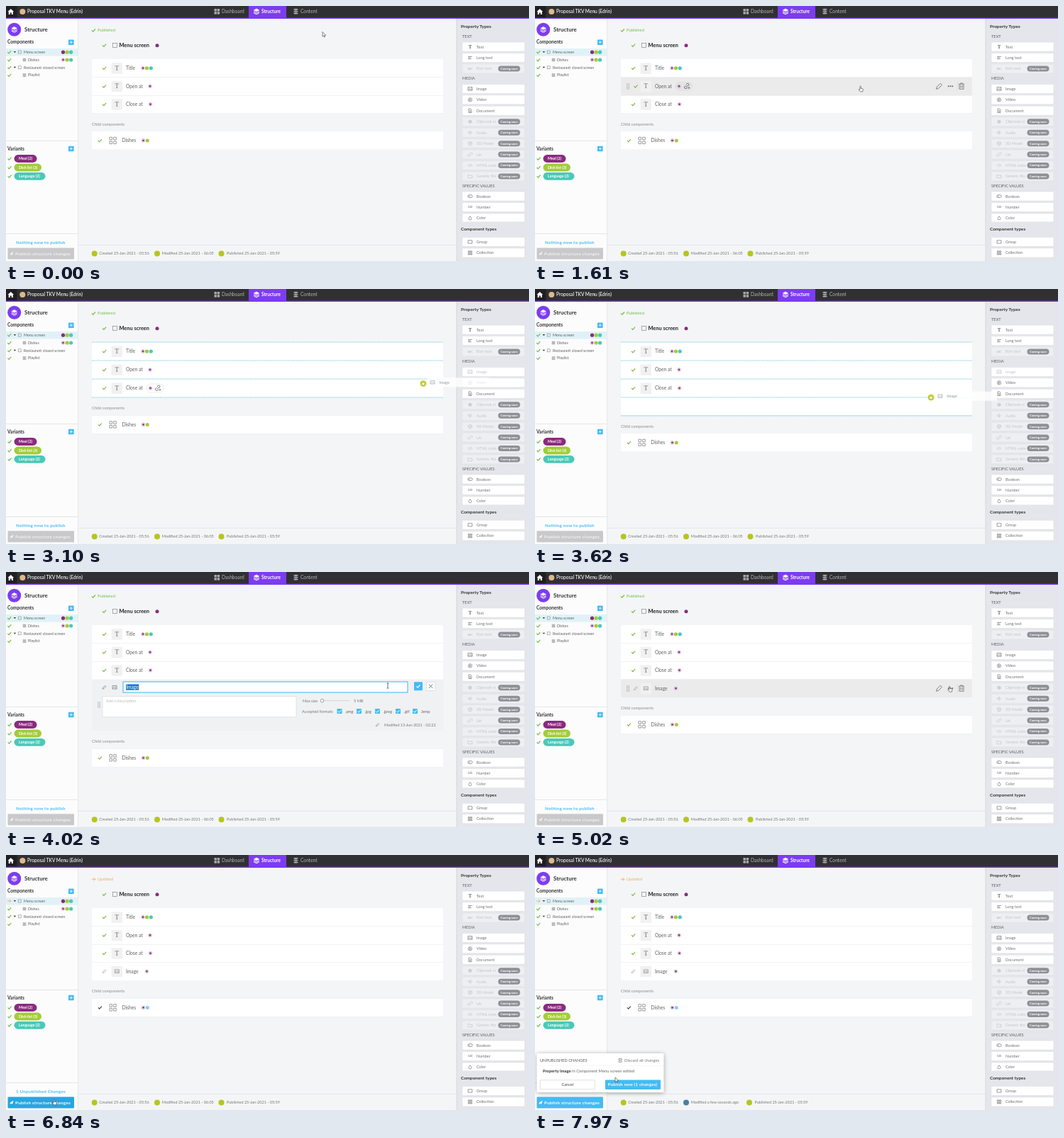
An HTML page for the animation above (8 s loop, 737x360 px).

```html
<!DOCTYPE html>
<html lang="en">
<head>
<meta charset="utf-8">
<title>Structure editor</title>
<style>
html, body { margin: 0; width: 100%; height: 100%; overflow: hidden; background: #f4f5f7; }
svg { display: block; width: 737px; height: 360px; font-family: Lato, "Open Sans", sans-serif; }
.card { filter: drop-shadow(0 .5px .7px #0002); }
.pop { filter: drop-shadow(0 1px 3px #0005); }
.serif { font-family: "Noto Serif", serif; }
</style>
</head>
<body>
<svg id="stage" viewBox="0 0 737 360"></svg>
<script>
const BLUE = '#45bbf2', PURPLE = '#8c2a80', LIME = '#a4cc39', TEAL = '#4ac9b8',
      GREEN = '#72bf44', GREY = '#8d8d8d', INK = '#606060', VIOLET = '#7d3cf0', ORANGE = '#eeb054';

// Drawing helpers; text is placed by its vertical centre
const text = (x, y, size, str, fill = INK, weight = 400, more = '') =>
  `<text x="${x}" y="${y + size * .35}" font-size="${size}" fill="${fill}" font-weight="${weight}" ${more}>${str}</text>`;
const rect = (x, y, w, h, fill, more = '') =>
  `<rect x="${x}" y="${y}" width="${w}" height="${h}" fill="${fill}" ${more}/>`;
const dot = (x, y, r, fill, more = '') => `<circle cx="${x}" cy="${y}" r="${r}" fill="${fill}" ${more}/>`;
const line = (d, color, w = .7, fill = 'none', more = '') =>
  `<path d="${d}" stroke="${color}" stroke-width="${w}" fill="${fill}" ${more}/>`;
const at = (x, y, body, scale = 1) => `<g transform="translate(${x} ${y}) scale(${scale})">${body}</g>`;
const card = (y, h) => rect(121, y, 495, h, '#fff', 'rx="1" class="card"');
const spaced = 'letter-spacing=".25"', centered = 'text-anchor="middle"';

// Icons
const check = (x, y, c = GREEN, w = 1.2) => line(`M${x - 2.4} ${y}l1.8 1.8 3.2-3.6`, c, w);
const arrowRight = (x, y) => line(`M${x - 2.6} ${y}h5m-2.2-2.2l2.2 2.2-2.2 2.2`, ORANGE, .9);
const ring = (x, y, c = PURPLE) =>
  dot(x, y, 2.4, '#fff', `stroke="${c}" stroke-width=".5" stroke-opacity=".6"`) + dot(x, y, 1.4, c);
const shapes = {
  longText: 'M-2.8-1.6h5.6M-2.8 0h3.6M-2.8 1.6h4.6',
  image: 'M-3-2.3h6v4.6h-6zM-2.6 1.6l1.7-2 1.2 1.2 1-.9 1.4 1.7M1-1h.6',
  video: 'M-2.6 0a2.6 2.6 0 1 0 5.2 0a2.6 2.6 0 1 0-5.2 0M-.7-1.2v2.4l1.9-1.2z',
  doc: 'M-2-2.8h2.6l1.4 1.4v4.2h-4zM-1 0h2M-1 1.3h2',
  audio: 'M-2.6-.9h1.4l1.6-1.5v4.8l-1.6-1.5h-1.4zM1.7-1.4q1.2 1.4 0 2.8',
  cube: 'M0-2.8l2.5 1.3v3l-2.5 1.3-2.5-1.3v-3zM-2.5-1.5l2.5 1.3 2.5-1.3M0-.2v3',
  link: 'M-.3-1l1-1.2q1.5-1 2.4.1t-.2 2.3l-1 1M.3 1l-1 1.2q-1.5 1-2.4-.1t.2-2.3l1-1M-1 .9l2-1.8',
  addLink: 'M-.6-1.6v-.3a1.6 1.6 0 0 1 3.2 0q0 1.6-1.6 1.6M-1.2-.2h-.5a1.5 1.5 0 0 0 0 3h.8q1.4 0 1.5-1.5M-1 1.3l2-2.4M1.4 2h2.4M2.6.8v2.4',
  code: 'M-1.4-1.8l-1.6 1.8 1.6 1.8M1.4-1.8l1.6 1.8-1.6 1.8M.5-2.2l-1 4.4',
  folder: 'M-3-2h2.2l.8.9h3v3.4h-6z',
  toggle: 'M-1.3-1.9h2.6a1.9 1.9 0 0 1 0 3.8h-2.6a1.9 1.9 0 0 1 0-3.8zM-1.9 0h1.2M-1.3-.6v1.2',
  drop: 'M0-2.8q4 4.6 0 5.2q-4-.6 0-5.2',
  group: 'M-2.9-2.1h5.8v4.2h-5.8z',
  grid: 'M-2.6-2.6h2v2h-2zM.6-2.6h2v2h-2zM-2.6.6h2v2h-2zM.6.6h2v2h-2z',
  pencil: 'M-2.7 2.7l.7-2.2 3.2-3.2 1.5 1.5-3.2 3.2z',
  trash: 'M-3.2-2.6h6.4M-1.1-2.6v-1h2.2v1M-2.5-2.6v6h5v-6M-.9-1.2v3.2M.9-1.2v3.2'
};
const icon = (name, x, y, c = GREY, scale = 1, w = .7) => at(x, y, line(shapes[name], c, w), scale);
const layers = (x, y, scale = 1) => at(x, y, line('M-4-1.6l4-2.2 4 2.2-4 2.2z', '#fff', .3, '#fff')
  + line('M-4 .3l4 2.2 4-2.2M-4 2.1l4 2.2 4-2.2', '#fff', 1), scale);
const handle = (x, y) => [0, 1, 2, 3].map(i =>
  rect(x - 1.8, y - 4 + i * 2.3, 1.2, 1.2, '#999') + rect(x + .7, y - 4 + i * 2.3, 1.2, 1.2, '#999')).join('');

function topBar() {
  return rect(0, 0, 737, 18, '#303032') + rect(0, 0, 15.5, 17, '#1f1f21') + rect(0, 16.6, 737, 1.4, VIOLET)
    + line('M2.5 8l4.3-4 4.3 4h-1.2v4h-2.1v-2.6h-2v2.6h-2.1v-4z', 'none', 0, '#fff')
    + dot(23.3, 8, 4, '#dfb98b')
    + text(30, 7.7, 6.6, 'Proposal TKV Menu (Edrin)', '#fff', 500)
    + rect(342, 0, 53, 18, VIOLET)
    + [[293.5, 4], [297.7, 4], [293.5, 8.2], [297.7, 8.2]].map(p => rect(...p, 3.4, 3.4, '#aaa')).join('')
    + text(304, 7.7, 6.65, 'Dashboard', '#b5b5b5')
    + layers(353, 7.5) + text(360, 7.7, 6.5, 'Structure', '#fff', 700)
    + [4.8, 7.6, 10.4].map(y => `<ellipse cx="408.5" cy="${y}" rx="3.2" ry="1.1" fill="#aaa"/>`).join('')
    + text(415, 7.7, 6.65, 'Content', '#b5b5b5');
}

function sidebar(k) {
  const changed = k >= 45;
  let s = rect(0, 18, 101.5, 342, '#fcfcfd') + rect(101, 18, .8, 342, '#e3e4e8')
    + dot(11.7, 33.3, 9.5, VIOLET) + layers(11.7, 33)
    + text(26, 33.3, 7.9, 'Structure', '#333', 700)
    + text(2, 51, 6.55, 'Components', '#333', 700) + text(2, 201.3, 6.6, 'Variants', '#333', 700)
    + rect(0, 60, 101, 10.6, '#e0f2f7')
    + rect(0, 190, 101, .7, '#ddd') + rect(0, 321, 101, .7, '#ddd');
  for (const y of [51.2, 201.5])
    s += rect(88, y - 3.8, 7.6, 7.6, BLUE, 'rx=".6"') + line(`M89.8 ${y}h4M91.8 ${y - 2}v4`, '#fff', .8);
  [['Menu screen', 65], ['Dishes', 76], ['Restaurant closed screen', 86.8], ['Playlist', 97.6]].forEach(([name, y], i) => {
    const child = i % 2;
    s += i == 0 && changed ? arrowRight(4.7, y) : check(4.7, y);
    if (child) s += icon('grid', 26, y, '#777', .75);
    else s += line(`M10.6 ${y - 1}h3.6l-1.8 2z`, 'none', 0, '#333') + rect(17.2, y - 2, 4, 4, 'none', 'stroke="#888" stroke-width=".6"');
    s += text(child ? 31 : 25, y, 5.35, name);
  });
  s += dot(80.5, 65.2, 2.6, PURPLE) + ring(80.5, 76);
  for (const y of [65.2, 76]) s += dot(86.1, y, 2.6, LIME) + dot(91.6, y, 2.6, TEAL);
  [['Meal (2)', 215.5, 32, PURPLE], ['Dish list (3)', 228, 38.5, LIME], ['Language (2)', 240.3, 44, TEAL]].forEach(([name, y, w, c]) => {
    s += check(5, y) + rect(11.5, y - 5.4, w, 10.8, c, 'rx="5.4"') + text(18, y, 5.3, name, '#fff', 700);
  });
  if (k < 62) s += text(14, 333.5, 6.2, changed ? '1 Unpublished Changes' : 'Nothing now to publish', BLUE, 700, spaced);
  const fill = !changed ? '#c9c9cb' : k >= 58 && k < 70 ? '#27a6e0' : BLUE, ink = changed ? '#fff' : '#f1f1f1';
  return s + rect(2.5, 341.5, 93.5, 16, fill, 'rx="1"')
    + line('M5.2 350.2l5.4-3.7-1.5 5.2-1.6-1.1-1.2 1.8-.1-1.9z', 'none', 0, ink)
    + text(13, 349.3, 6.3, 'Publish structure changes', ink, 700, spaced);
}

function propertyPanel(k) {
  const dragging = k >= 20 && k <= 28;
  let s = rect(635, 18, 102, 342, '#e5e6eb') + rect(634.5, 18, 1, 342, '#d3d4da');
  const item = (name, y, kind, soon) => {
    const ink = soon || (kind == 'image' && dragging) ? '#c3c4c9' : '#707070';
    s += rect(643, y - 6.5, 88, 13, soon ? '#eeeff2' : '#fff', `rx="1" stroke="${soon ? '#dcdde2' : '#d9dade'}" stroke-width=".5"`);
    s += shapes[kind] ? icon(kind, 654, y, ink) : kind == 'dot' ? dot(654, y, 2.6, '#cfd0d4')
      : text(654, y, kind.length > 1 ? 3.6 : 7, kind, ink, 700, centered + (kind == 'T' ? ' class="serif"' : ''));
    s += text(663, y, 5.5, name, ink);
    if (soon) s += rect(693.5, y - 4, 31, 8, '#8f9097', 'rx="4"') + text(697, y, 4.1, 'Coming soon', '#fff', 700);
  };
  const list = (top, items) => items.forEach(([name, kind, soon], i) => item(name, top + i * 15.45, kind, soon));
  s += text(641, 28.6, 6.4, 'Property Types', '#333', 700)
    + text(643, 43.5, 5.7, 'TEXT') + text(643, 102.5, 5.5, 'MEDIA') + text(643, 254.5, 5.7, 'SPECIFIC VALUES');
  list(57.6, [['Text', 'T'], ['Long text', 'longText'], ['Rich text', 'ABC', 1]]);
  list(116.9, [['Image', 'image'], ['Video', 'video'], ['Document', 'doc'], ['Clipnook vi', 'dot', 1], ['Audio', 'audio', 1],
    ['3D Model', 'cube', 1], ['Url', 'link', 1], ['HTML code', 'code', 1], ['Generic file', 'folder', 1]]);
  list(268.6, [['Boolean', 'toggle'], ['Number', '123'], ['Color', 'drop']]);
  s += rect(635.5, 304.5, 102, 56, '#e5e6eb') + text(641, 314.3, 6.35, 'Component types', '#333', 700);
  list(333, [['Group', 'group'], ['Collection', 'grid']]);
  return s;
}

function editForm() {
  let s = rect(121, 151.5, 495, 72.5, '#f0f1f3')
    + icon('pencil', 138.5, 162.8, '#666', .9) + icon('image', 153, 162.8, '#777') + handle(131, 187.5)
    + rect(165, 155, 401, 15, '#fff', 'stroke="#4abcf0" stroke-width="1.1"')
    + rect(169, 158.5, 18.2, 8.2, '#1976d2') + text(169.2, 162.6, 6.7, 'Image', '#fff')
    + rect(575, 155.3, 12, 12, BLUE, 'rx=".8"') + check(580.8, 161.3, '#fff')
    + rect(592.3, 155.3, 12.6, 12, '#fff', 'stroke="#d0d0d0" stroke-width=".6"')
    + line('M595.8 158.5l5.6 5.6m0-5.6l-5.6 5.6', '#666', .9)
    + rect(136, 175.8, 273, 29, '#fff', 'stroke="#dadadc" stroke-width=".7"')
    + text(141, 182.3, 5.5, 'Add a description', '#bbb')
    + text(418, 181.7, 5.6, 'Max size', '#777') + line('M446 181.7h38', '#ccc', .8)
    + dot(445.5, 181.7, 2.3, '#fff', 'stroke="#888" stroke-width=".8"') + text(490, 181.7, 5.6, '5 MB', '#777')
    + text(417, 196.8, 5.65, 'Accepted formats', '#777')
    + icon('pencil', 523.5, 215.8, '#777', .8) + text(533, 215.7, 5.45, 'Modified 13-Jun-2021 - 02:22', '#777');
  [['.png', 466.5], ['.jpg', 494], ['.jpeg', 520], ['.gif', 549], ['.bmp', 573]].forEach(([name, x]) => {
    s += rect(x, 193, 7, 7, BLUE, 'rx=".6"') + check(x + 3.4, 196.5, '#fff', 1) + text(x + 11.5, 196.6, 6, name, '#666');
  });
  return s;
}

function propertyRow(name, x, y, hover, k) {
  const isImage = name == 'Image', sx = hover ? 142 : 138.5;
  let s = '';
  if (hover) s += rect(121, y - 12.7, 495, 25.5, '#ebebec') + handle(131, y + .2)
    + (k >= 45 ? rect(578, y - 7, 15, 14, '#d8d8da', 'rx="1"') : '')
    + icon('pencil', 569.5, y, '#777', 1.5, .6) + [582.7, 585.5, 588.3].map(d => dot(d, y, 1, '#666')).join('')
    + line(`M595.5 ${y - 6}v12`, '#d4d4d4', .6) + icon('trash', 601, y, '#777', 1.2);
  s += isImage ? icon('pencil', sx, y, '#999', .9) : check(sx, y);
  s += rect(148.5, y - 7.6, 15.5, 15.5, '#f1f1f2', 'rx=".8"')
    + (isImage ? icon('image', 156.3, y, '#888') : text(156.3, y, 8.5, 'T', '#999', 700, centered + ' class="serif"'))
    + text(169, y, 6.7, name);
  const linked = (name == 'Open at' && hover) || (name == 'Close at' && k >= 22 && k <= 24);
  if (linked) s += rect(198, y - 6, 24, 12, hover ? '#e4e4e6' : '#fff', 'rx="6" stroke="#ddd" stroke-width=".6"')
    + icon('addLink', 214, y, '#666', 1.15);
  s += ring(x, y, isImage && k >= 50 ? '#66506a' : PURPLE);
  if (name == 'Title') s += dot(198.5, y, 2.6, LIME) + dot(204.3, y, 2.6, TEAL);
  return s;
}

function mainArea(k) {
  const dragging = k >= 20 && k <= 28, gap = k >= 25 && dragging, form = k >= 30 && k <= 37,
        added = k == 29 || k >= 38, rowH = dragging ? 26 : 25.5,
        hovered = k >= 4 && k <= 5 ? 0 : k >= 6 && k <= 18 ? 1 : added && k <= 49 ? 3 : -1;
  const rows = [['Title', 193], ['Open at', 203], ['Close at', 203.5]];
  if (added) rows.push(['Image', 198.4]);
  const base = 75 + 3 * rowH, bottom = base + (form ? 72.5 : added || gap ? 25.5 : 0);
  let s = rect(101.5, 18, 533, 342, '#f4f5f7')
    + (k >= 45 ? arrowRight(123.5, 34.3) + text(129, 34, 5.8, 'Updated', ORANGE) : check(123.3, 34.3) + text(129, 34, 5.85, 'Published', GREEN))
    + check(138.5, 55.5) + rect(150.3, 52.6, 6, 6, 'none', 'stroke="#888" stroke-width=".7"')
    + text(159.5, 55.5, 7.4, 'Menu screen', '#222', 700) + dot(213, 55.7, 2.5, PURPLE)
    + card(75, bottom - 75);
  rows.forEach(([name, x], i) => {
    s += propertyRow(name, x, 75 + (i + .5) * rowH, i == hovered, k);
    if (i && !dragging) s += rect(121, 75 + i * rowH, 495, .6, '#e9e9eb');
  });
  if (form) s += editForm();
  if (dragging) for (let i = 0; i < (gap ? 5 : 4); i++)
    s += line(`M121 ${75 + i * rowH}h495`, '#6cc5de', .8, 'none', 'stroke-dasharray="1.6 .8"');
  s += text(121, bottom + 15, 5.8, 'Child components', '#8b8b8b');
  if (k >= 45 && k <= 50) {
    const swing = .65 * Math.cos((k - 48) * .8);
    return s + dot(351.7, 205.5, 2.45 + swing, '#37aef0') + dot(360.2, 205.5, 2.45 - swing, '#6fc6f5');
  }
  const y = bottom + 38.4, reloaded = k >= 51;
  return s + card(bottom + 25.5, 25.7) + check(132.3, y, reloaded ? '#444' : GREEN)
    + icon('grid', 150.6, y, '#888', 1.8, .45) + text(163.5, y, 6.7, 'Dishes')
    + ring(193.5, y) + dot(199.3, y, 2.5, reloaded ? '#86cdf5' : LIME);
}

function footer(k) {
  const saving = k >= 45 && k < 55, recent = k >= 66, avatar = '#b4c61f';
  let s = rect(102, 337, 532.5, .7, '#dfe0e4')
    + dot(124.7, 349.5, 4, saving ? '#6fb94d' : avatar) + text(131.3, 349.3, 5.5, 'Created 25-Jan-2021 - 05:56', '#777')
    + dot(213, 349.5, 4, recent ? '#4b7fa3' : avatar)
    + text(219.8, 349.3, 5.5, recent ? 'Modified a few seconds ago' : 'Modified 25-Jan-2021 - 06:05', '#777');
  if (saving) s += dot(124.7, 348.4, 1.3, '#fff') + line('M122.3 352q2.4-3 4.8 0z', 'none', 0, '#fff');
  else s += at(recent ? -1.5 : 0, 0, dot(303.5, 349.5, 4, avatar) + text(311, 349.3, 5.5, 'Published 25-Jan-2021 - 05:59', '#777'));
  return s;
}

function popup(k) {
  if (k < 62) return '';
  return `<g opacity="${Math.min(1, (k - 61) / 3)}">` + rect(2.5, 280, 179, 55, '#fff', 'rx="1.5" class="pop"')
    + text(7, 290, 5.6, 'UNPUBLISHED CHANGES', '#555') + icon('trash', 120.2, 290, '#777', .8)
    + text(126, 290, 5.9, 'Discard all changes', '#777') + rect(2.5, 297.5, 179, .5, '#eee')
    + text(11, 305.3, 5.8, '<tspan font-weight="700" fill="#333">Property Image</tspan> in Component Menu screen edited', '#666')
    + rect(7.2, 317.8, 77, 13, '#fff', 'rx="1" stroke="#ccc" stroke-width=".6"')
    + text(45.8, 324.2, 5.6, 'Cancel', '#444', 400, centered)
    + rect(99, 317.5, 78, 13.5, BLUE, 'rx="1"') + text(102.7, 324.2, 6, 'Publish now (1 changes)', '#fff', 700, spaced) + '</g>';
}

// Pointer path: step, x, y
const path = [[-1, 446, 36.5], [7, 458, 113], [11, 458, 113], [20, 642, 119], [22, 588, 133.5], [28, 552, 157], [31, 538, 160.5],
  [32, 538, 160.5], [33, 575, 188], [35, 575, 188], [37, 581, 160], [39, 581, 160], [42, 585, 162], [44, 585, 162],
  [48, 466, 180], [52, 345, 203], [59, 67, 345], [68, 67, 345], [70, 113, 314]];
const pointers = {
  arrow: line('M0 0v6.6l1.5-1.4 1.1 2.4 1-.5-1.1-2.3h2.2z', '#333', .6, '#fff'),
  hand: line('M0 .4q.7-.8 1.2.1v2.7l2.4.6q.9.3.7 1.3l-.6 2.7h-3.3l-2.3-2.8q.2-1 1.9.1z', '#333', .6, '#fff'),
  beam: line('M-1.3-3.5h2.6M0-3.5v7M-1.3 3.5h2.6', '#333', .7),
  grab: dot(0, 0, 4.6, '#cbd92c') + line('M-2-.6q.5-1.5 1.4-.8q.7-.8 1.3 0q1-.4 1.4.6v1.6q-.4 1.5-1.6 1.6h-1.2l-1.5-1.6z', '#666', .5, '#fff')
};
const pointerKinds = [[69, 'arrow'], [58, 'hand'], [50, 'arrow'], [37, 'hand'], [33, 'arrow'], [30, 'beam'], [29, 'arrow'],
  [20, 'grab'], [19, 'arrow'], [4, 'hand'], [-1, 'arrow']];

function pointer(k) {
  const i = Math.max(1, path.findIndex(p => p[0] >= k));
  const [k0, x0, y0] = path[i - 1], [k1, x1, y1] = path[i], p = (k - k0) / (k1 - k0);
  const x = x0 + (x1 - x0) * p, y = y0 + (y1 - y0) * p;
  let s = '';
  if (k >= 21 && k <= 28) s += at(x, y, `<g opacity=".82">${rect(5, -8.3, 88, 13, '#fff', 'rx="1"')}</g>`
    + icon('image', 13, -1.8, '#aaa') + text(22.2, -1.8, 5.6, 'Image', '#999'));
  return s + at(x, y, pointers[pointerKinds.find(e => k >= e[0])[1]]);
}

function tooltip(k) {
  return k < 45 || k > 49 ? '' : rect(563, 140.8, 45, 12.2, '#6b6b6d', 'rx=".8"') + text(569, 146.8, 5.6, 'More options', '#fff');
}

const stage = document.getElementById('stage');
let shown;
function frame() {
  const t = performance.now() % 8000, k = Math.max(-1, Math.min(70, Math.floor((t - 875) / 101)));
  if (k !== shown) {
    shown = k;
    stage.innerHTML = mainArea(k) + footer(k) + sidebar(k) + propertyPanel(k) + topBar() + tooltip(k) + popup(k) + pointer(k);
  }
  requestAnimationFrame(frame);
}
frame();
</script>
</body>
</html>
```
